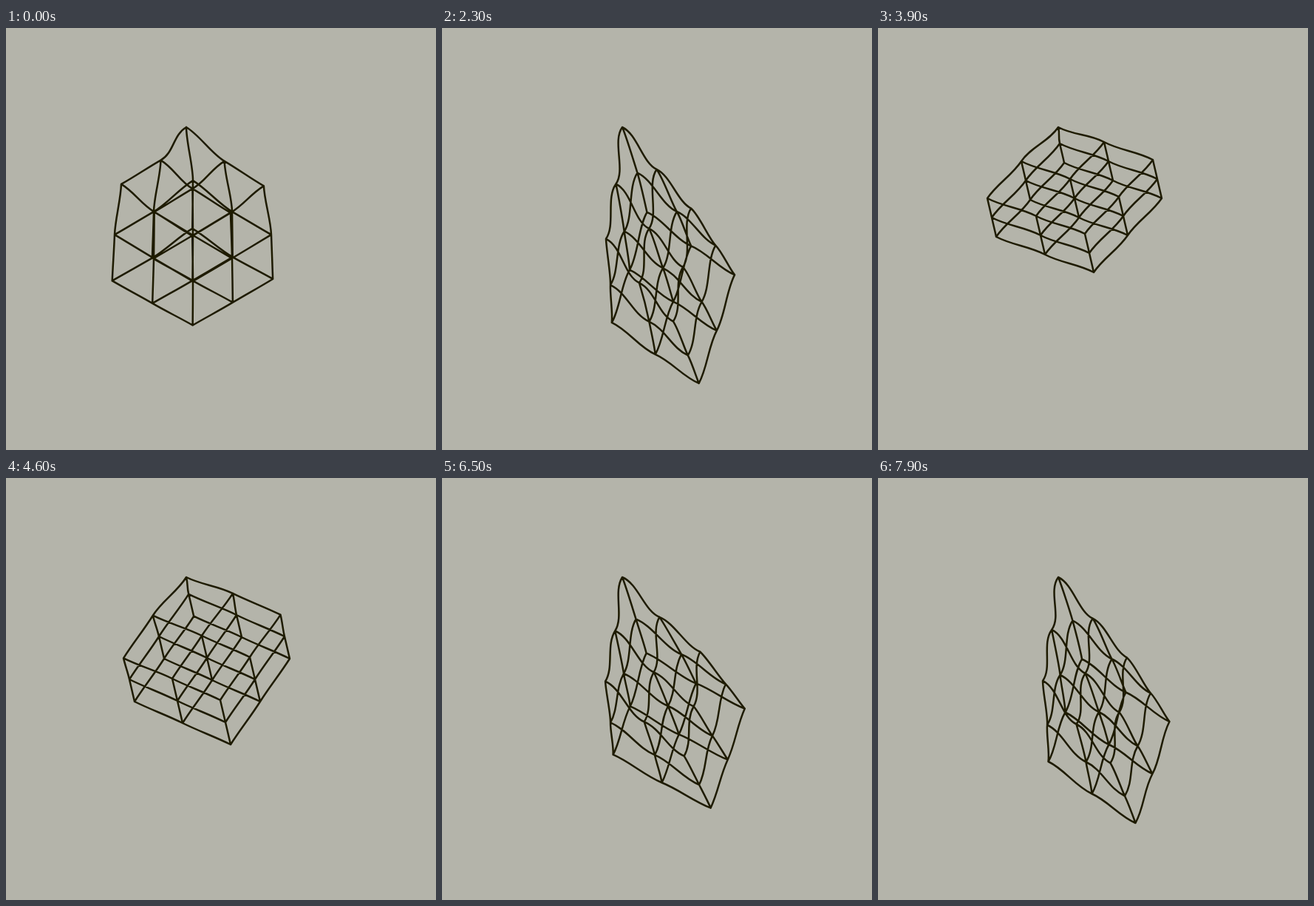
Write an HTML page with a canvas that moves like this. It is 582 px wide and 570 px high and loops after 8000 ms.

```html
<!DOCTYPE html>
<html lang="en">
<head>
<meta charset="utf-8">
<title>Hanging elastic lattice</title>
<style>
html, body { margin: 0; width: 100%; height: 100%; overflow: hidden; background: #b4b4aa; }
canvas { display: block; }
</style>
</head>
<body>
<canvas id="stage" width="582" height="570"></canvas>
<script>
const ctx = document.getElementById('stage').getContext('2d');
const LOOP = 8000, STEP = 100, CELL = 76;
const PIN = [244, 134];

// time, lattice centre, then the mean cell edges along the three axes
const POSES = [
  [0,    253, 280,   53, 31.5,   -53, 31.5,   0, 62],
  [350,  267, 329,   47, 55,     -42, 60,     13, 73],
  [750,  312, 306,   58, 44,     -17, 70,     20, 45],
  [1300, 313, 302,   55.5, 44.5, -8, 72,      18.5, 38],
  [2400, 298, 323,   53, 47,     -20, 74,     16, 49],
  [3200, 293, 282.5, 64, 35.5,   -29.5, 67.5, 12, 33],
  [3900, 266, 230,   66, 24,     -46, 50,     6, 26],
  [4600, 272, 243,   65, 29,     -40, 58,     7, 30],
  [5300, 278, 270,   66, 35,     -45, 57,     8, 42],
  [5800, 281, 293,   61, 35.5,   -38.5, 57.5, 8, 43],
  [6100, 290, 330,   54, 50,     -28, 70,     14, 67],
  [6500, 306, 308,   60, 42,     -18, 68,     17, 42],
  [7200, 303, 313,   54, 47.5,   -15.5, 70.5, 16.5, 46],
  [7500, 301, 319,   53, 48.5,   -17, 71.5,   16.5, 49.5],
  [7900, 299, 316,   52.5, 48,   -17.5, 69.5, 16, 48]
];

const clamp01 = v => Math.max(0, Math.min(1, v));

function slope(n, c) {
  const rate = m => (POSES[m + 1][c] - POSES[m][c]) / (POSES[m + 1][0] - POSES[m][0]);
  if (n === 0) return rate(0);
  if (n === POSES.length - 1) return rate(n - 1);
  const before = POSES[n][0] - POSES[n - 1][0];
  const after = POSES[n + 1][0] - POSES[n][0];
  return (rate(n - 1) * after + rate(n) * before) / (before + after);
}

// Smooth cubic through the poses
function poseAt(time) {
  let n = 0;
  while (n < POSES.length - 2 && time >= POSES[n + 1][0]) n++;
  const from = POSES[n], to = POSES[n + 1];
  const span = to[0] - from[0], u = clamp01((time - from[0]) / span), v = 1 - u;
  return from.map((p, c) =>
    p * (1 + 2 * u) * v * v + to[c] * u * u * (3 - 2 * u) +
    span * u * v * (slope(n, c) * v - slope(n + 1, c) * u));
}

// Turns stretched cell edges into the rotated, unstretched ones
function unstretch(axes) {
  let xx = 0, yy = 0, xy = 0;
  for (const [x, y] of axes) {
    xx += x * x;
    yy += y * y;
    xy += x * y;
  }
  const s = Math.sqrt(Math.max(1, xx * yy - xy * xy));
  const k = CELL / (s * Math.sqrt(xx + yy + 2 * s));
  return axes.map(([x, y]) => [k * ((yy + s) * x - xy * y), k * ((xx + s) * y - xy * x)]);
}

function buildNodes(time) {
  const [, cx, cy, ix, iy, jx, jy, kx, ky] = poseAt(time);
  const bend = clamp01((cy - 271) / 40);

  const place = (a, b, c) => [
    cx + a * ix + b * jx + c * kx + bend * (6.5 * a * c - 5.5 * b * c - 2.5 * c * c),
    cy + a * iy + b * jy + c * ky - bend * (6.5 * a * c + b * c + 4 * c * c + 2 * a * a + 2 * b * b)
  ];
  const edges = (a, b, c) => [
    [ix + bend * 6.5 * c, iy - bend * (6.5 * c + 4 * a)],
    [jx - bend * 5.5 * c, jy - bend * (c + 4 * b)],
    [kx + bend * (6.5 * a - 5.5 * b - 5 * c), ky - bend * (6.5 * a + b + 8 * c)]
  ];

  // Pull on the pinned corner also draws in the three edges that meet there
  const pull = PIN[1] - place(-1, -1, -1)[1];
  const pinch = 0.03 - pull * 0.0075;
  const mean = [[ix, iy], [jx, jy], [kx, ky]];

  const nodes = [];
  for (let k = 0; k < 3; k++) for (let j = 0; j < 3; j++) for (let i = 0; i < 3; i++) {
    const at = [i, j, k];
    const local = at.map(v => v - 1);
    let p = place(...local);
    const off = at.filter(v => v > 0).length;
    if (off === 0) p = PIN;
    if (off === 1) {
      const axis = at.findIndex(v => v > 0);
      const g = pinch * (at[axis] === 1 ? 1 : 0.8);
      p = p.map((v, d) => v - g * mean[axis][d]);
    }
    nodes.push({ at, p, tangents: unstretch(edges(...local)) });
  }
  return nodes;
}

function draw(time) {
  const nodes = buildNodes(time);
  ctx.fillStyle = '#b4b4aa';
  ctx.fillRect(0, 0, 582, 570);
  ctx.strokeStyle = '#1e1b00';
  ctx.lineWidth = 2.5;
  ctx.lineCap = ctx.lineJoin = 'round';
  ctx.beginPath();
  nodes.forEach((node, n) => {
    [1, 3, 9].forEach((stride, axis) => {
      if (node.at[axis] === 2) return;
      const next = nodes[n + stride];
      const [x0, y0] = node.p, [x1, y1] = next.p;
      const [ux, uy] = node.tangents[axis], [vx, vy] = next.tangents[axis];
      ctx.moveTo(x0, y0);
      ctx.bezierCurveTo(x0 + ux / 3, y0 + uy / 3, x1 - vx / 3, y1 - vy / 3, x1, y1);
    });
  });
  ctx.stroke();
}

const start = performance.now();
function tick() {
  const time = (performance.now() - start) % LOOP;
  draw(Math.floor(time / STEP) * STEP);
  requestAnimationFrame(tick);
}
tick();
</script>
</body>
</html>
```
